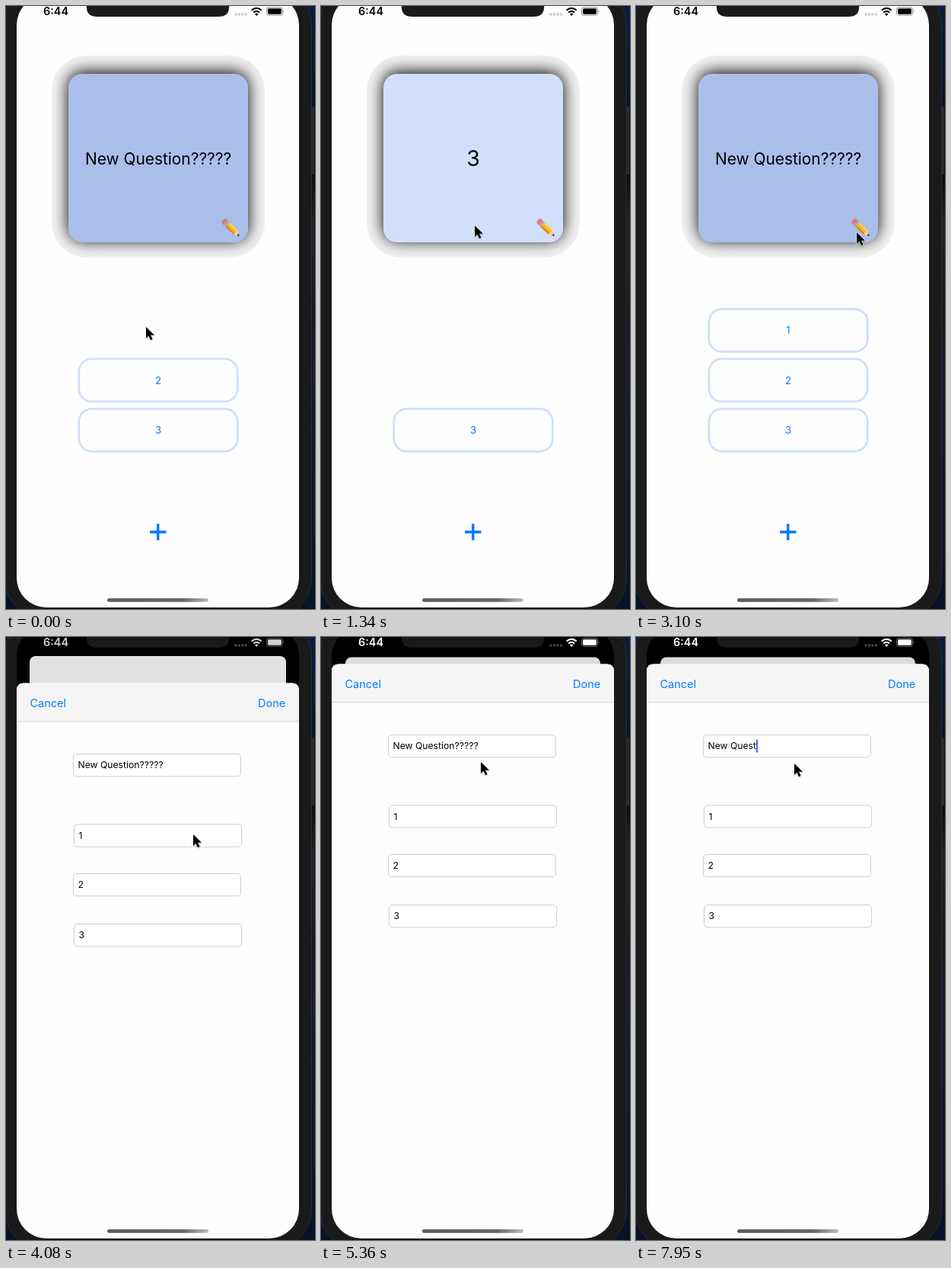
An HTML page that plays this animation: 406 by 791 pixels, repeating every 8 s.

```html
<!DOCTYPE html>
<html lang="en">
<head>
<meta charset="utf-8">
<title>Flashcard app</title>
<style>
  html, body { margin: 0; width: 100%; height: 100%; overflow: hidden; background: #0b1222; }
  svg { display: block; width: 100vw; height: 100vh; }
  text { font-family: Inter, "Liberation Sans", Arial, sans-serif; }
  .mid { text-anchor: middle; }
  .blue { fill: #007aff; }
</style>
</head>
<body>
<svg viewBox="0 0 406 791" xmlns="http://www.w3.org/2000/svg">
  <defs>
    <linearGradient id="desk" x1="0" y1="0" x2="0" y2="1">
      <stop offset="0" stop-color="#0a1c3c"/>
      <stop offset=".16" stop-color="#081428"/>
      <stop offset=".28" stop-color="#0b0d13"/>
      <stop offset=".36" stop-color="#20232c"/>
      <stop offset=".5" stop-color="#171a22"/>
      <stop offset=".62" stop-color="#131b31"/>
      <stop offset="1" stop-color="#091226"/>
    </linearGradient>
    <linearGradient id="homeFill">
      <stop offset="0" stop-color="#5c5c5c"/>
      <stop offset=".75" stop-color="#666"/>
      <stop offset="1" stop-color="#bdbdbd"/>
    </linearGradient>
    <clipPath id="screenClip"><rect x="14" y="-14" width="371" height="803" rx="39"/></clipPath>
    <clipPath id="glowClip"><rect x="60" y="65" width="280" height="265" rx="46"/></clipPath>
    <filter id="blur" x="-30%" y="-30%" width="160%" height="160%"><feGaussianBlur stdDeviation="10.5"/></filter>
    <filter id="soft" x="-50%" y="-50%" width="200%" height="200%"><feGaussianBlur stdDeviation=".9"/></filter>
  </defs>

  <rect width="406" height="791" fill="url(#desk)"/>
  <rect x="400" y="132" width="5" height="89" rx="1.5" fill="#2b2b2c"/>
  <rect x="-2" y="-29" width="403.500" height="834" rx="55" fill="#1a1a1a" stroke="#2c2c2e"/>

  <g clip-path="url(#screenClip)">
    <rect id="screen" x="14" y="-14" width="371" height="803"/>

    <g id="home">
      <g clip-path="url(#glowClip)">
        <rect x="60" y="65" width="280" height="265" fill="#f3f3f3"/>
        <rect x="82" y="86.500" width="236" height="221" rx="18" filter="url(#blur)"/>
      </g>
      <rect id="card" x="82" y="89" width="236" height="221" rx="18"/>
      <text id="question" class="mid" x="200" y="207.500" font-size="20.900">New Question?????</text>
      <text id="answer" class="mid" x="200" y="210" font-size="28.500">3</text>
      <g id="pencil" transform="translate(295.500 291) rotate(44)">
        <path d="M-14.500-1.500q0-2.500 2.500-2.500h3v8h-3q-2.500 0-2.500-2.500z" fill="#e8747c"/>
        <path d="M-9.500-4h3.500v8h-3.500z" fill="#a9aaad"/>
        <path d="M-6-4H8.500v8H-6z" fill="#f6b62c"/>
        <path d="M-6-4H8.500v2.500H-6z" fill="#fbd04f"/>
        <path d="M-6 1.700H8.500V4H-6z" fill="#d98a1c"/>
        <path d="M8.500-4 15.500 0 8.500 4z" fill="#f0cfa0"/>
        <path d="M12.600-1.700 15.800 0 12.600 1.700z" fill="#3a3633"/>
      </g>
      <g id="choices"></g>
      <path d="M189 690h21.500M199.700 679.300v21.500" stroke="#007aff" stroke-width="3.400"/>
    </g>

    <g id="modal">
      <rect id="back" height="80" rx="8"/>
      <g id="sheet">
        <rect x="14" width="371" height="830" rx="9" fill="#fefefe"/>
        <path d="M14 50V9q0-9 9-9h353q9 0 9 9v41z" fill="#f5f5f5"/>
        <path d="M14 50.300h371" stroke="#d2d2d2"/>
        <text class="blue" x="31.500" y="31" font-size="14.500">Cancel</text>
        <text class="blue" x="367.300" y="31" font-size="14.500" text-anchor="end">Done</text>
        <g id="fields"></g>
        <rect id="caret" y="99" width="1.900" height="17" rx=".6" fill="#3e62dd"/>
      </g>
    </g>

    <rect x="133" y="777" width="133" height="4.800" rx="2.400" fill="url(#homeFill)"/>
    <path d="M100-14H300V-3q-7 1-7 5 0 12-14 12H120q-14 0-14-12 0-4-6-5z" fill="#1a1a1a"/>
    <g id="status">
      <text x="49" y="12.300" font-size="14.400" font-weight="600">6:44</text>
      <g id="dots"></g>
      <g fill="none" stroke="currentColor" stroke-width="2.200">
        <path d="M322.700 5.600q6.500-5.600 13 0"/>
        <path d="M325.200 8.500q4-3.300 8 0"/>
      </g>
      <path d="M326.900 10.400q2.300-1.800 4.600 0l-2.300 2.500z"/>
      <rect x="342.500" y="1.800" width="21" height="10.400" rx="3" fill="none" stroke="currentColor" stroke-opacity=".45"/>
      <rect x="344" y="3.300" width="18" height="7.400" rx="1.700"/>
      <path d="M364.700 5.200q1.800 1.800 0 3.600z" opacity=".5"/>
    </g>
  </g>

  <g id="cursor">
    <path d="M0 1v15l3.500-3.200 2.600 5.500 2.800-1.200-2.500-5.300h5z" opacity=".4" filter="url(#soft)"/>
    <path d="M0 0v15l3.400-3.200 2.500 5.400 2.700-1.200-2.500-5.300h4.900z" stroke="#fff" stroke-width="1.300" stroke-linejoin="round" paint-order="stroke"/>
  </g>
</svg>

<script>
const LOOP = 8000;
const FULL_TEXT = "New Question?????";
const $ = id => document.getElementById(id);
const set = (el, attrs) => { for (const k in attrs) el.setAttribute(k, attrs[k]); };
const show = (el, on) => set(el, { visibility: on ? "inherit" : "hidden" });
const between = (t, a, b) => t >= a && t < b;
const ramp = (t, a, b) => Math.min(1, Math.max(0, (t - a) / (b - a)));
const mix = (a, b, p) => a + (b - a) * p;

function make(parent, tag, attrs, text = "") {
  const el = document.createElementNS("http://www.w3.org/2000/svg", tag);
  set(el, attrs);
  el.textContent = text;
  return parent.appendChild(el);
}

const choices = [1, 2, 3].map((n, i) => {
  const y = 397.5 + i * 65.4;
  const group = make($("choices"), "g", {});
  make(group, "rect", { x: 95.8, y, width: 208.5, height: 56, rx: 17, fill: "#fefefe", stroke: "#d2dffb", "stroke-width": 2.8 });
  const label = make(group, "text", { class: "mid blue", x: 200, y: y + 32.8, "font-size": 13.2 }, n);
  return { group, label };
});

const inputs = [[88.5, 93, FULL_TEXT], [89.5, 185.3, "1"], [88.5, 249.8, "2"], [89.5, 316, "3"]].map(([x, y, text]) => {
  make($("fields"), "rect", { x, y, width: 220, height: 29.4, rx: 4.5, fill: "#fff", stroke: "#cecece" });
  return make($("fields"), "text", { x: x + 6, y: y + 18.8, "font-size": 12.2 }, text);
});

const dots = [0, 1, 2, 3].map(i => make($("dots"), "circle", { cx: 302 + i * 4.4, cy: 11, r: 1.7 }));

// Pointer stops: time, x, y
const path = [
  [30, 184, 421], [250, 172.5, 478], [500, 172.5, 478], [700, 186, 546],
  [960, 186, 546], [1340, 202, 288], [1620, 202, 288], [2100, 221.5, 584],
  [2240, 221.5, 584], [2350, 262, 612], [2480, 303, 500], [2620, 295.5, 339],
  [2820, 295.5, 339], [3100, 290, 297], [3480, 290, 297], [3850, 246, 259],
  [4300, 246, 259], [4840, 213, 160], [4900, 210, 152], [5100, 210, 152],
  [5190, 205, 141.5], [5300, 205, 141.5], [5360, 210, 164], [5420, 210, 164],
  [5600, 202, 192], [5890, 208, 166]
];
const deletions = [6620, 6710, 6800, 6890, 7130, 7420, 7690, 7950];

function pointerAt(t) {
  const next = path.findIndex(stop => stop[0] > t);
  if (next === 0) return path[0].slice(1);
  if (next < 0) return path[path.length - 1].slice(1);
  const [t0, x0, y0] = path[next - 1], [t1, x1, y1] = path[next];
  const p = ramp(t, t0, t1);
  return [mix(x0, x1, p), mix(y0, y1, p)];
}

function drawHome(t) {
  const answered = between(t, 870, 1520);
  const reset = t >= 1520;
  set($("card"), { fill: answered ? "#d2dffb" : "#a9bfe9" });
  show($("question"), !answered);
  show($("answer"), answered);
  show(choices[0].group, reset);
  show(choices[1].group, reset || t < 500);
  set(choices[1].label, { opacity: between(t, 420, 500) ? 0.2 : 1 });
  set(choices[2].label, { opacity: between(t, 870, 940) ? 0.2 : 1 });
  set($("pencil"), { opacity: t < 3340 ? 1 : mix(0.25, 1, ramp(t, 3420, 3650)) });
}

function drawModal(t) {
  const away = t < 4200 ? 1 : Math.exp((4080 - t) / 100) * (1 - ramp(t, 4500, 4840));
  const grey = Math.round(mix(219, 225, away));
  set($("sheet"), { transform: `translate(0 ${35.5 + 25 * away})` });
  set($("back"), { x: 32 - away, y: 26.5 - 1.5 * away, width: 335 + 2 * away, fill: `rgb(${grey},${grey},${grey})` });

  const removed = deletions.filter(at => t >= at).length;
  const field = inputs[0];
  field.textContent = FULL_TEXT.slice(0, FULL_TEXT.length - removed);
  const lit = t < 5480 ? 0 : t < 6530 ? 1 - ramp(t, 6040, 6180) : 1;
  set($("caret"), { x: 94.5 + field.getComputedTextLength(), opacity: lit });
  return away;
}

function draw(t) {
  const open = t >= 4080;
  show($("home"), !open);
  show($("modal"), open);
  set($("screen"), { fill: open ? "#000" : "#fefefe" });
  let ink = 0;
  if (open) ink = Math.round(255 - 45 * drawModal(t));
  else drawHome(t);
  const color = `rgb(${ink},${ink},${ink})`;
  set($("status"), { fill: color, color });
  dots.forEach(dot => set(dot, { fill: open ? "#474747" : "#c6c6c6" }));
  set($("cursor"), { transform: `translate(${pointerAt(t).join(" ")})` });
}

function tick() {
  draw(performance.now() % LOOP);
  requestAnimationFrame(tick);
}
tick();
</script>
</body>
</html>
```
